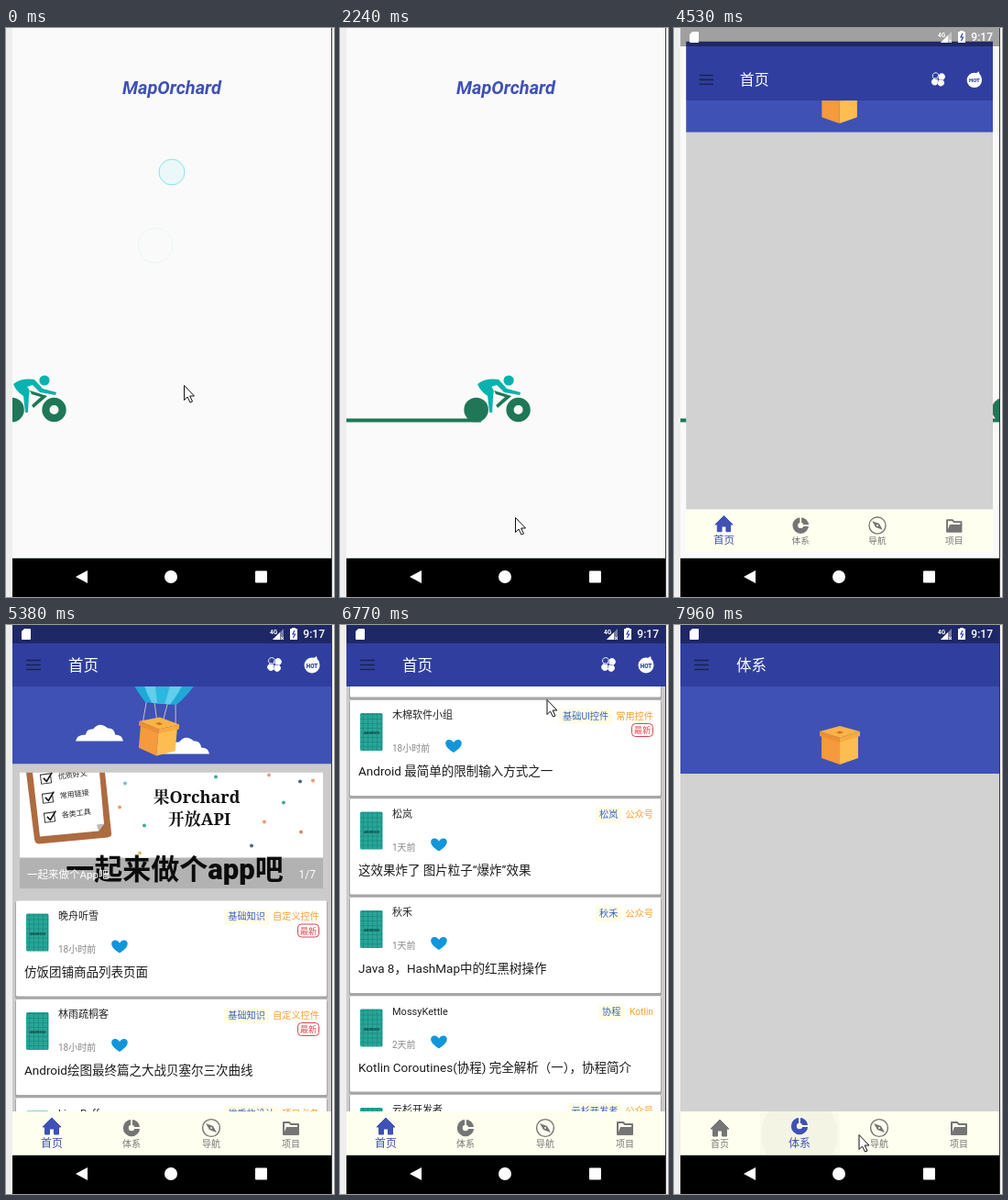
An HTML page for the animation above (8 s loop, 358 by 620 pixels).

```html
<!DOCTYPE html>
<html lang="zh">
<head>
<meta charset="utf-8">
<style>
html, body { margin: 0; width: 100%; height: 100%; overflow: hidden; background: #eee; }
#stage { display: block; font-family: Roboto, "Noto Sans CJK SC", "Noto Sans CJK", sans-serif; }
</style>
</head>
<body>
<svg id="stage" width="358" height="620" viewBox="0 0 358 620"></svg>
<script>
const LOOP = 8000, PITCH = 107.5, SCALE = 335 / 348;
const INDIGO = '#3f51b5', BAR = '#303f9f', GREEN = '#1f7757', CYAN = '#08b2ae', IVORY = '#fffff0', GREY = '#757575';

// The picture advances in short steps: [first, last, count]
const runs = [[0, 0, 1], [150, 1150, 8], [1270, 2240, 8], [2390, 3380, 8], [3530, 3530, 1],
  [4530, 5380, 7], [5540, 5540, 1], [5690, 6630, 8], [6770, 7810, 9], [7960, 7960, 1]];
const steps = runs.flatMap(([a, b, n]) => Array.from({ length: n }, (_, i) => a + (b - a) * i / Math.max(1, n - 1)));

const cursorPath = [[0, 194, 389], [150, 194, 389], [900, 192, 570], [1150, 192, 560], [2240, 191, 533],
  [2390, 191, 533], [3000, 250, 558], [3380, 360, 500], [5540, 360, 500], [5690, 340, 430], [6227, 206, 352],
  [6365, 210, 530], [6630, 222, 60], [6770, 225.5, 81], [7030, 228, 36], [7550, 140, 548], [7750, 150, 552], [7960, 201.5, 555]];
const scrollPath = [[6365, 0], [6630, 430], [6770, 456.5], [7200, 535]];
const headerPath = [[4530, 36], [4674, 95], [5240, 95], [5380, 84.5], [5540, 55], [5690, 15], [5830, 0], [7950, 0], [7960, 95]];
const bubbles = [[181, 157, -420], [163, 237, -651], [130, 175, 40], [237, 128, 300]];

const posts = [
  ['晚舟听雪', '18小时前', '仿饭团铺商品列表页面', '基础知识', '自定义控件', true],
  ['林雨疏桐客', '18小时前', 'Android绘图最终篇之大战贝塞尔三次曲线', '基础知识', '自定义控件', true],
  ['LimePuff', '18小时前', 'Android版结巴分词：原理、接入和启动优化', '优秀的设计', '项目必备', true],
  ['木棉软件小组', '18小时前', 'Android 最简单的限制输入方式之一', '基础UI控件', '常用控件', true],
  ['松岚', '1天前', '这效果炸了 图片粒子“爆炸”效果', '松岚', '公众号'],
  ['秋禾', '1天前', 'Java 8，HashMap中的红黑树操作', '秋禾', '公众号'],
  ['MossyKettle', '2天前', 'Kotlin Coroutines(协程) 完全解析（一），协程简介', '协程', 'Kotlin'],
  ['云杉开发者', '2天前', 'Android 布局优化实践', '云杉开发者', '公众号'],
];

const clamp = v => Math.min(1, Math.max(0, v));
const ramp = (t, a, b) => clamp((t - a) / (b - a));
function along(path, t) {
  const i = path.findIndex(key => key[0] > t);
  if (i === 0) return path[0].slice(1);
  if (i < 0) return path.at(-1).slice(1);
  const a = path[i - 1], b = path[i], k = ramp(t, a[0], b[0]);
  return a.slice(1).map((v, j) => v + (b[j + 1] - v) * k);
}

const rect = (x, y, w, h, fill, more = '') => `<rect x="${x}" y="${y}" width="${w}" height="${h}" fill="${fill}" ${more}/>`;
const disc = (x, y, r, fill, more = '') => `<circle cx="${x}" cy="${y}" r="${r}" fill="${fill}" ${more}/>`;
const shape = (d, fill, more = '') => `<path d="${d}" fill="${fill}" ${more}/>`;
const line = (d, color, width) => shape(d, 'none', `stroke="${color}" stroke-width="${width}"`);
const text = (x, y, size, fill, s, more = '') => `<text x="${x}" y="${y}" font-size="${size}" fill="${fill}" ${more}>${s}</text>`;
const move = (x, y, body, more = '') => `<g transform="translate(${x} ${y}) ${more}">${body}</g>`;
const clip = (x, y, w, h, body) => `<svg x="${x}" y="${y}" width="${w}" height="${h}" viewBox="${x} ${y} ${w} ${h}">${body}</svg>`;
const END = 'text-anchor="end"', MID = 'text-anchor="middle"';

function splash(t) {
  const k = ramp(Math.min(t, 3530), 1113, 3710);
  const left = -7 + 358 * (1 - Math.cos(Math.PI * k)) / 2;
  const rings = bubbles.map(([x, y, born]) => {
    const p = (t - born) / 700;
    return p < 0 || p > 1 ? '' : disc(x, y, 5 + 15 * p, '#d0f5f8',
      `fill-opacity="${2.2 * (1 - p) ** 2}" stroke="#26cfdd" stroke-opacity="${1.3 * (1 - p)}"`);
  }).join('');
  const trail = t > 1150 ? rect(7, 425.5, Math.max(0, left + 12), 4, GREEN) : '';
  const bike = disc(13.5, 416, 13.3, GREEN) + disc(59.5, 416, 13.2, GREEN) + disc(59.5, 416, 5, '#fafafa')
    + shape('M33 395L52 401 37 414 35 411 45 402 35 399Z', GREEN)
    + shape('M15 388Q24 381 38 383L47 393 62 397 61 400 44 397 36 389 30 391Q34 394 32 400L31 419 28 419 26 401Q18 396 15 388Z', CYAN)
    + disc(49, 384, 5.6, CYAN);
  return text(181, 72, 20, INDIGO, 'MapOrchard', `${MID} font-weight="700" font-style="italic"`)
    + rings + trail + move(left, 0, bike);
}

const cardboardBox = shape('M-20-10L0-4V21L-20 14Z', '#f59a3d') + shape('M20-10L0-4V21L20 14Z', '#fdbd50')
  + shape('M-22-15L0-21 22-15 0-8Z', '#fbb345') + shape('M-22-15L0-8V-3L-22-10Z', '#ee8f35')
  + shape('M22-15L0-8V-3L22-10Z', '#f8ab40') + shape('M-4-14L0-15.5 4-14 0-12.5Z', '#c96f24');
const envelope = shape('M-17-36Q-51-72-42-102Q0-142 42-102Q51-72 17-36Z', '#1fa9d6')
  + shape('M-10-36Q-34-72-26-110L26-110Q34-72 10-36Z', '#62cdec')
  + shape('M-4-36Q-13-72-9-117L9-117Q13-72 4-36Z', '#2bb8de')
  + line('M-16-36L-18-14M16-36L18-14M-7-36L-3-18M7-36L4-18', '#e9d9bd', .8);
const cloud = shape('M-26 6Q-25-1-15-1Q-14-8-7-7Q0-16 9-8Q16-9 17-1Q25-1 26 6Z', '#fff');

function header(t, h) {
  if (h <= 0) return '';
  const bottom = 67 + h, flying = t < 7900 && t > 4700;
  const drift = flying ? ramp(t, 5100, 5380) : 0;
  const drop = -130 * (1 - ramp(t, 4800, 5100));
  const clouds = flying ? `<g opacity="${ramp(t, 4700, 4950)}">`
    + move(102 + (t - 5380) * .03, bottom - 31, cloud) + move(196 + (t - 5380) * .03, bottom - 17, cloud) + '</g>' : '';
  const load = (flying ? move(0, drop, envelope) : '') + cardboardBox;
  return clip(7, 67, 348, h, rect(7, 67, 348, h, INDIGO) + clouds
    + move(181 - 15 * drift, bottom - 31 + drift, load, `rotate(${5 * drift})`));
}

const confetti = [[130, 12, '#8bc'], [124, 38, '#e97'], [151, 58, '#4a9'], [229, 5, '#4a9'], [287, 3, '#e98'],
  [321, 10, '#567'], [335, 9, '#e97'], [282, 54, '#e97'], [303, 33, '#4a9'], [322, 65, '#d86'], [268, 80, '#567'], [146, 88, '#db6']];

function banner(y) {
  const rows = ['优质好文', '常用链接', '各类工具'].map((s, i) => move(44 + 2 * i, 7 + 21 * i,
    line('M-6-5H5V5H-6Z', '#333', 1) + line('M-3-1L0 3 7-6', '#111', 1.6) + text(13, 2, 8, '#222', s, 'font-weight="500"'), 'rotate(-7)')).join('');
  const serif = `${MID} font-weight="700" style="font-family:'Noto Serif','Noto Serif CJK SC','Noto Sans CJK SC',serif"`;
  return move(0, y, clip(15, 0, 331, 127, rect(15, 0, 331, 127, '#fff')
    + confetti.map(([x, cy, c]) => disc(x, cy, 2, c)).join('')
    + shape('M22 0L31 73Q32 78 36 78L111 71Q116 70 115 66L108 0Z', '#ad6b40')
    + shape('M29 0L37 70 101 64 107 56 102 0Z', '#fff') + shape('M101 64L107 56 99 57Z', '#bbb') + rows
    + text(208, 33, 18, '#111', '果Orchard', serif) + text(211, 57, 18, '#111', '开放API', serif)
    + text(184, 116, 31, '#111', '一起来做个app吧', `${MID} font-weight="900"`)
    + rect(15, 93, 331, 34, '#000', 'opacity=".3"')
    + text(23, 115, 11.5, '#fff', '一起来做个App吧') + text(338, 115, 12, '#fff', '1/7', END)));
}

const tagWidth = s => [...s].reduce((w, c) => w + (c > '\u2e80' ? 10.2 : 4.6), 0);

function card([author, age, title, topic, group, fresh], y) {
  const edge = 338 - tagWidth(group), w = tagWidth(topic);
  return move(0, y, rect(10, 1, 341, 106, '#a6a6a6', 'rx="2"') + rect(11, 0, 339, 104, '#fff', 'rx="1.5"')
    + rect(22, 14, 24.5, 41, 'url(#cells)', 'rx="1.5"') + text(34.5, 37, 4, '#123f3b', 'ANDROID', `${MID} font-weight="700"`)
    + text(57, 20, 11, '#222', author) + text(57, 56, 10, '#888', age)
    + move(age.length > 4 ? 124 : 108, 50, shape('M0 7C-14-2-8-8-4-7Q-1.5-6.5 0-4Q1.5-6.5 4-7C8-8 14-2 0 7Z', '#1296db'))
    + rect(edge - w - 8, 9, w + 8, 17, '#fffde4') + text(edge - 4, 20.5, 10.2, '#3b62c4', topic, END)
    + text(342, 20.5, 10.2, '#ff9e2c', group, END)
    + (fresh ? rect(318.5, 25.5, 23, 14, 'none', 'rx="4" stroke="#e0404c"') + text(330, 36, 9, '#e0404c', '最新', MID) : '')
    + text(20, 82, 13.5, '#1c1c1c', title));
}

const navItems = [
  ['首页', c => shape('M-10 1L0-9 10 1H7.5V9H2.5V3H-2.5V9H-7.5V1Z', c, `stroke="${c}" stroke-linejoin="round"`)],
  ['体系', c => disc(0, 0, 6.2, 'none', `stroke="${c}" stroke-width="6"`) + line('M0-10V-2M2 0H10', IVORY, 1.8)],
  ['导航', c => disc(0, 0, 9.4, 'none', `stroke="${c}" stroke-width="1.4"`) + shape('M-6-5L2-2 6 5-2 2Z', c) + disc(0, 0, 1, IVORY)],
  ['项目', c => shape('M-8-6H-2L0-4H8V7H-8Z', 'none', `stroke="${c}" stroke-width="2" stroke-linejoin="round"`) + shape('M-5-1H9L7 7H-8Z', c)],
];

function bottomNav(t, tab) {
  const r = ramp(t, 7600, 7960);
  const ripple = r ? clip(94, 530, 87, 48, disc(137, 555, 48 * r, '#000', 'opacity=".02"') + disc(137, 555, 42 * r, '#000', 'opacity=".025"')) : '';
  return rect(7, 530, 348, 48, IVORY) + ripple + navItems.map(([label, icon], i) => {
    const on = i === tab, color = on ? INDIGO : GREY, x = 50 + 87 * i;
    return move(x, on ? 546 : 548, icon(color)) + text(x, 569, on ? 12 : 10, color, label, MID);
  }).join('');
}

function toolbar(tab) {
  const petal = 'M-1-1L-6-.5A4 4 0 1 1-.5-6Z';
  const clover = [0, 90, 180, 270].map(a => move(0, 0,
    shape(petal, a ? '#fff' : 'none', 'stroke="#fff" stroke-linejoin="round"'), `rotate(${a + 8}) scale(.88)`)).join('');
  const hot = disc(0, 0, 8.5, '#fff') + shape('M-7-5Q0-6 5-10Q5-7 8-4Z', '#fff')
    + text(0, 2.7, 6.3, BAR, 'HOT', `${MID} font-weight="900"`);
  return rect(7, 0, 348, 67, BAR) + line('M22 38.5H38M22 43.5H38M22 48.5H38', '#1b2354', 1.6)
    + text(68, 49.5, 16.5, '#fff', navItems[tab][0], 'font-weight="500"')
    + (tab ? '' : move(293, 43, clover) + move(334, 44, hot));
}

function app(t) {
  const tab = t >= 7900 ? 1 : 0, [h] = along(headerPath, t), [scroll] = along(scrollPath, t);
  const top = 67 + h - scroll;
  const list = t > 5050 && !tab
    ? banner(top + 9) + posts.map((post, i) => card(post, top + 149 + PITCH * i)).join('') : '';
  const content = rect(7, 67, 348, 463, list ? '#cbcbcb' : '#d2d2d2') + clip(7, 67, 348, 463, list);
  const opening = t < 4600;
  const [x, y, k] = opening ? [13.1, 14.5, SCALE] : [7, 0, 1];
  return `<svg x="${x}" y="${y}" width="${348 * k}" height="${578 * k}" viewBox="7 0 348 578">`
    + content + header(t, h) + toolbar(tab) + bottomNav(t, tab) + '</svg>' + statusBar();
}

function statusBar() {
  return rect(7, 0, 348, 20, '#000', 'opacity=".36"')
    + shape('M20 4H26Q27 4 27 5V15Q27 16 26 16H18Q17 16 17 15V7Z', '#fff')
    + text(288, 9.5, 6.5, '#fff', '4G', 'font-weight="700"')
    + shape('M291 16L303 4V16Z', '#fff', 'opacity=".4"') + shape('M291 16L299 8V16Z', '#fff') + line('M300 13L303 16M303 13L300 16', '#fff', 1)
    + shape('M312 4V3H316V4H318V16H310V4Z', '#fff') + line('M315 6L313 10H315.5L313.5 14', BAR, 1.2)
    + text(348, 14.3, 12, '#fff', '9:17', `${END} font-weight="500"`);
}

const systemNav = rect(7, 577, 348, 1, '#b9cfc4') + rect(7, 578, 348, 42, '#000')
  + shape('M76 598L89 591V605Z', '#fff') + disc(180, 598, 7, '#fff') + rect(272, 591.5, 13, 13, '#fff', 'rx="1"');
const frame = rect(0, 0, 7, 620, '#eee') + rect(355, 0, 1, 620, '#3a3a3a') + rect(356, 0, 2, 620, '#f4f4f4');
const pointer = shape('M.5.5V16.5L4 13 7 19 9.5 18 6.7 12H11.5Z', '#fff', 'stroke="#111"');
const defs = `<defs><pattern id="cells" width="5" height="5" patternUnits="userSpaceOnUse">${
  rect(0, 0, 5, 5, '#26a698') + line('M0 .5H5M.5 0V5', '#1c877c', .7)}</pattern></defs>`;

const stage = document.getElementById('stage');
let shown = -1;
function draw() {
  const now = performance.now() % LOOP;
  const t = steps.findLast(s => s <= now);
  if (t !== shown) {
    shown = t;
    stage.innerHTML = defs + rect(7, 0, 348, 620, '#fafafa') + splash(t) + (t >= 4530 ? app(t) : '')
      + systemNav + frame + move(...along(cursorPath, t), pointer);
  }
  requestAnimationFrame(draw);
}
draw();
</script>
</body>
</html>
```
